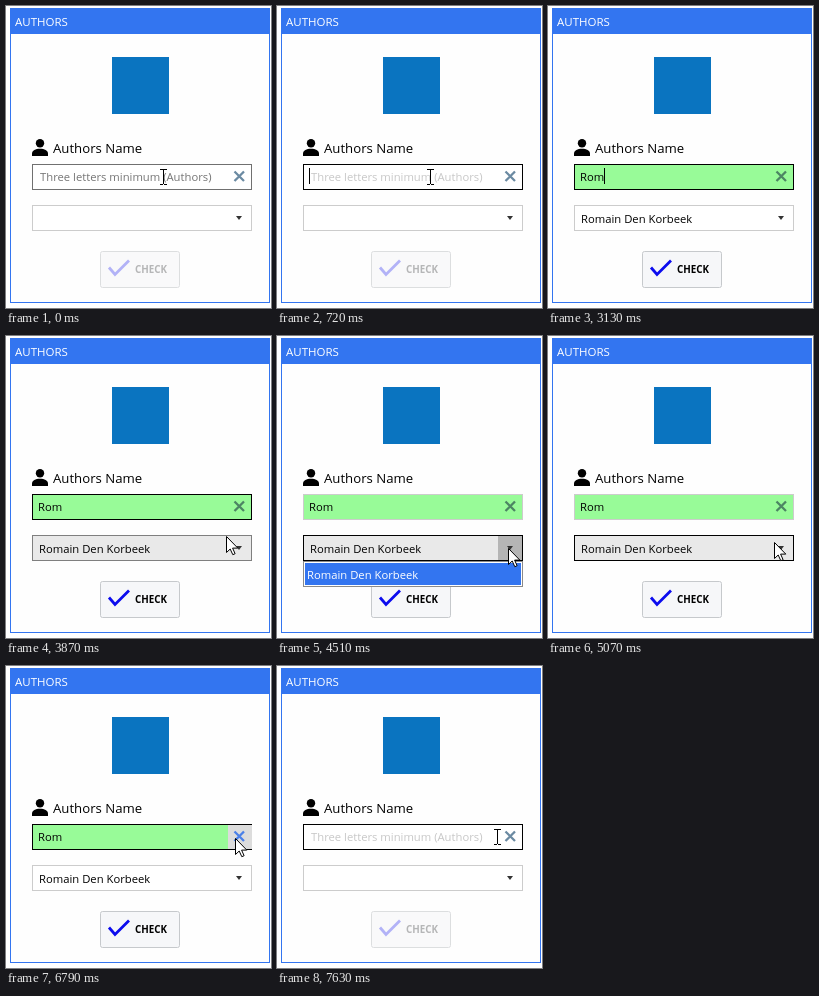
Animation of 265 by 302 pixels, one loop 8 s. Source, as an HTML page:

```html
<!DOCTYPE html>
<html lang="en">
<head>
<meta charset="utf-8">
<title>Authors form</title>
<style>
html, body { margin: 0; width: 100%; height: 100%; overflow: hidden; background: #fff; }
svg { display: block; width: 265px; height: 302px; }
text { font: 11.25px "Open Sans", "Noto Sans", sans-serif; white-space: pre; }
.crisp { shape-rendering: crispEdges; }
</style>
</head>
<body>
<svg viewBox="0 0 265 302">
  <rect width="265" height="302" fill="#fff"/>
  <rect x="4.5" y="2.5" width="259" height="294" fill="#fefefe" stroke="#3375f0"/>
  <rect class="crisp" x="4" y="2" width="260" height="26" fill="#3375f0"/>
  <text x="9" y="20" fill="#fff" style="font-size:11.5px">AUTHORS</text>

  <rect x="106" y="51" width="57" height="57" fill="#0a74c0"/>

  <circle cx="34" cy="137.3" r="4.2"/>
  <path d="M26 150v-2.5c0-3 3.600-4.700 8-4.700s8 1.700 8 4.700v2.500z"/>
  <text x="47" y="147" style="font-size:13.2px">Authors Name</text>

  <rect id="box" x="26.5" y="158.5" width="219" height="25"/>
  <rect id="clear" class="crisp" x="222" y="159" width="24" height="24" fill="#dcdcdc"/>
  <path id="cross" d="M228.500 165.500l9.500 9.500m0-9.500l-9.500 9.500" fill="none" stroke-width="2.3"/>
  <text id="hint" x="34" y="175" fill="#757575">Three letters minimum (Authors)</text>
  <text id="typed" x="32" y="175"></text>
  <rect id="caret" class="crisp" y="162" width="1" height="16"/>

  <g id="button">
    <rect x="94.5" y="245.5" width="79" height="36" rx="2" fill="#f6f7f9" stroke="#c6c9cc"/>
    <path id="tick" d="M103 261.500l6 7L123 254.500" fill="none" stroke="#0c0cee" stroke-width="2.8"/>
    <text id="label" x="129" y="267.3" style="font-size:9.8px;font-weight:700">CHECK</text>
  </g>

  <rect id="combo" x="26.5" y="199.5" width="219" height="25"/>
  <rect id="toggle" class="crisp" x="221" y="200" width="24" height="24" fill="#b5b5b5"/>
  <path d="M230 210h6l-3 4z" fill="#333"/>
  <text id="choice" x="33" y="217">Romain Den Korbeek</text>

  <clipPath id="reveal"><rect id="open" x="26" y="225" width="220" height="0"/></clipPath>
  <g id="list" clip-path="url(#reveal)">
    <rect x="26.5" y="225.5" width="219" height="25" fill="#fff" stroke="#8a8a8a"/>
    <rect class="crisp" x="28" y="227" width="216" height="22" fill="#3375f0"/>
    <text x="30" y="243" fill="#fff">Romain Den Korbeek</text>
  </g>

  <path id="arrow" d="M.5.5v16l3.700-3.500 2.600 5.700 2.300-1-2.500-5.600h5.200z" fill="#fff" stroke="#000"/>
  <path id="beam" class="crisp" d="M-3-7h3m1 0h3M-3 8h3m1 0h3M.5-7v15" fill="none"/>
</svg>
<script>
const LOOP = 8000, STEP = 45, BLINK = 530;
const FOCUS = 540, OPEN = 4330, CLOSE = 4970, REFOCUS = 6740, CLEAR = 6970;
const KEYS = [1590, 1820, 3130], NAME = "Romain";

const el = id => document.getElementById(id);
const set = (id, attrs) => { for (const k in attrs) el(id).setAttribute(k, attrs[k]); };
const show = (id, on) => set(id, { visibility: on ? "visible" : "hidden" });
const within = (v, a, b) => v >= a && v < b;
const ramp = (t, a, b) => Math.min(1, Math.max(0, (t - a) / (b - a)));

// pointer gestures: where each one ends, and how far it arcs upwards
const gestures = [
  { from: 0, to: 30, x: 153, y: 170 },
  { from: 3310, to: 3870, x: 220, y: 200, arc: 42 },
  { from: 3870, to: 4150, x: 231, y: 212 },
  { from: CLOSE, to: 5300, x: 212, y: 190 },
  { from: 5480, to: 5580, x: 189, y: 174 },
  { from: 6190, to: 6500, x: 229, y: 172 },
  { from: 7385, to: 7480, x: 220, y: 170 }
];

function pointer(t) {
  let x = 157, y = 170;
  for (const g of gestures) {
    if (t < g.from) break;
    const k = t >= g.to ? 1 : Math.floor((t - g.from) / STEP) * STEP / (g.to - g.from);
    x += (g.x - x) * k;
    y += (g.y - y) * k - (g.arc || 0) * Math.sin(Math.PI * k);
  }
  return [Math.round(x), Math.round(y)];
}

// steady while typing, otherwise blinking since focus, last key or clearing
function caretOn(t, count) {
  if (within(count, 1, KEYS.length)) return true;
  const since = [FOCUS + 60, KEYS.at(-1), CLEAR + 130].filter(s => s <= t).pop();
  return (within(t, FOCUS, OPEN) || t >= CLEAR + 130) && Math.floor((t - since) / BLINK) % 2 === 0;
}

function hintOpacity(t) {
  if (t < KEYS[0]) return 1 - 0.6 * ramp(t, FOCUS - STEP, 720);
  return 0.4 * ramp(t, CLEAR - STEP, 7200);
}

function draw(t) {
  const [x, y] = pointer(t);
  const seen = !within(t, KEYS[0], 3310);
  const inside = seen && within(x, 26, 246);
  const overBox = inside && within(y, 158, 184);
  const overClear = overBox && x >= 222;
  const overCombo = inside && within(y, 199, 225);
  const count = t < CLEAR ? KEYS.filter(k => k <= t).length : 0;
  const full = count === KEYS.length;
  const focus = within(t, FOCUS, OPEN) || t >= REFOCUS;
  const opened = within(t, OPEN, CLOSE);

  set("box", { fill: full ? "#98fb98" : "#fff", stroke: focus ? "#000" : overBox ? "#707070" : "#ccc" });
  show("clear", overClear);
  set("cross", { stroke: overClear ? "#4a80e8" : full ? "#4c8563" : "#6b8aa2" });
  set("hint", { opacity: hintOpacity(t) });
  el("typed").textContent = NAME.slice(0, count);
  set("caret", { x: 32 + (count && Math.round(el("typed").getComputedTextLength())) });
  show("caret", caretOn(t, count));

  set("combo", {
    fill: full && (overCombo || opened) ? "#e9e9e9" : "#fff",
    stroke: within(t, OPEN, REFOCUS) ? "#000" : overCombo ? "#7f7f7f" : "#ccc"
  });
  show("toggle", opened);
  show("choice", full);
  show("list", opened);
  set("open", { height: 26 * ramp(t, OPEN, 4510) });

  set("tick", { opacity: full ? 1 : 0.5 });
  set("label", { opacity: full ? 1 : 0.45 });
  set("button", { opacity: full ? 1 : 0.6 });

  const transform = `translate(${x} ${y})`;
  show("arrow", seen && (!overBox || overClear));
  show("beam", overBox && !overClear);
  set("arrow", { transform });
  set("beam", { transform, stroke: full ? "#670467" : "#000" });
}

const start = performance.now();
function frame() {
  draw((performance.now() - start) % LOOP);
  requestAnimationFrame(frame);
}
frame();
</script>
</body>
</html>
```
